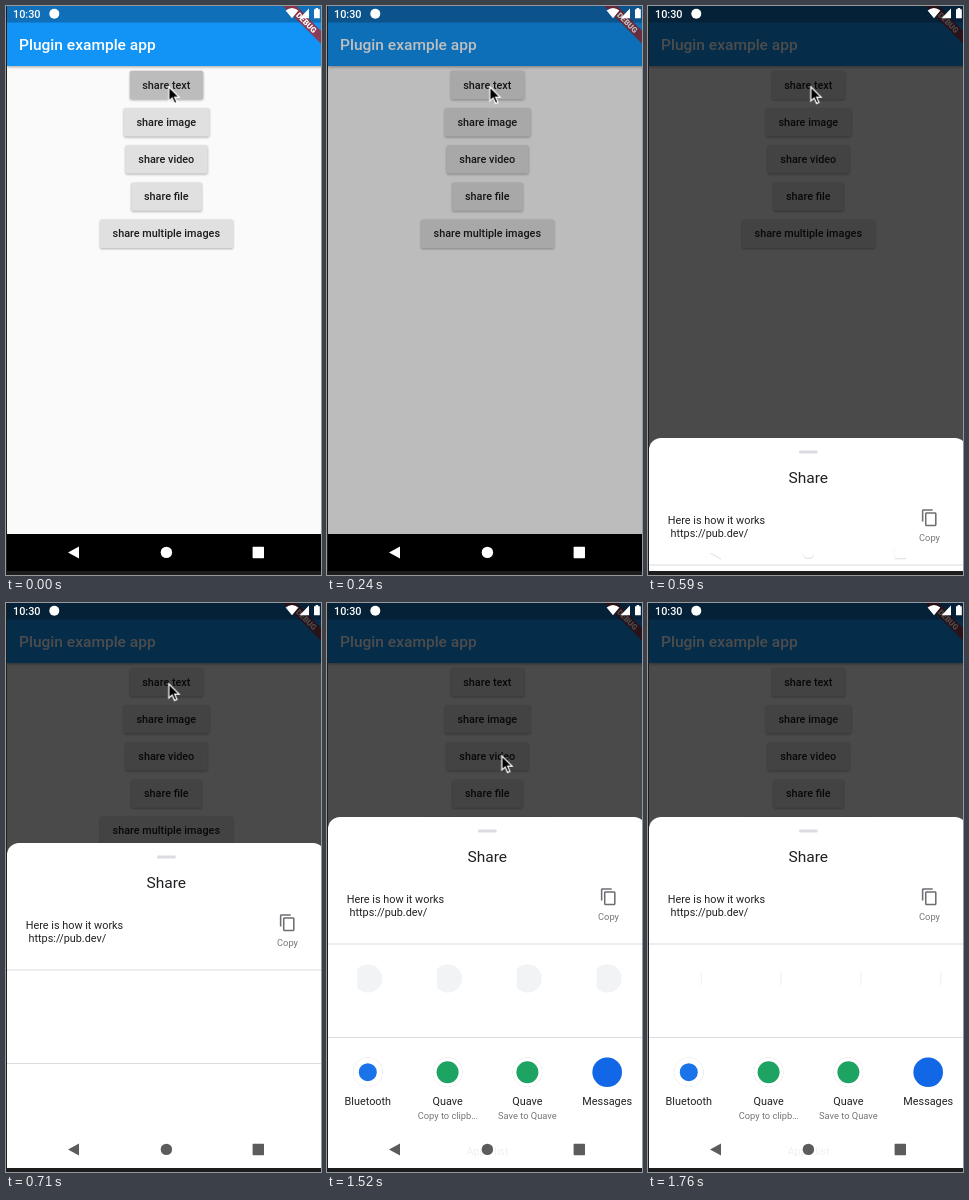
Animation of 315x569 px, one loop 3150 ms. Source, as an HTML page:

```html
<!DOCTYPE html>
<html lang="en">
<head>
<meta charset="utf-8">
<title>Share sheet</title>
<style>
  html, body { margin: 0; width: 100%; height: 100%; overflow: hidden; background: #1d1d1d; }
  svg { display: block; width: 315px; height: 569px; font: 10.85px Roboto, sans-serif; }
  .mid { text-anchor: middle; }
  .medium { font-weight: 500; }
  .small { font-size: 9.3px; fill: #757575; }
  .raised { fill: #e0e0e0; filter: drop-shadow(0 1px .8px rgba(0, 0, 0, .3)); }
  .disc { fill: #fff; filter: drop-shadow(0 .6px .7px rgba(0, 0, 0, .28)); }
  .bar { fill: #1294f6; filter: drop-shadow(0 1px 1.5px rgba(0, 0, 0, .35)); }
  .line { fill: #dadce0; }

  .step { animation: 3150ms step-end infinite; }
  #press { animation-name: press; }
  #dim { animation-name: dim; }
  #sheet { animation-name: rise; }
  #apps { animation-name: load; }
  #nav { animation-name: nav; }
  #cursor { animation-name: point; }
  .ghost { fill: #f2f3f5; animation-name: sweep; }

  @keyframes press {
    0% { opacity: .16; }
    3.809% { opacity: .06; }
    7.619%, 100% { opacity: 0; }
  }
  @keyframes dim {
    0% { opacity: 0; }
    3.809% { opacity: .06; }
    7.619% { opacity: .25; }
    11.428%, 100% { opacity: .7; }
  }
  @keyframes rise {
    0% { transform: translateY(580px); }
    18.73% { transform: translateY(432px); }
    22.539% { transform: translateY(240px); }
    26.349%, 100% { transform: translateY(214px); }
  }
  @keyframes load {
    0% { opacity: 0; }
    26.349%, 100% { opacity: 1; }
  }
  @keyframes nav {
    0% { fill: #fff; filter: none; }
    18.73% { fill: #fff; filter: drop-shadow(0 1px 0 #ddd); }
    22.539%, 100% { fill: #5c5c5c; filter: none; }
  }
  @keyframes sweep {
    0% { clip-path: inset(0 100% 0 0); }
    29.841% { clip-path: inset(0 70% 0 0); }
    48.253% { clip-path: inset(0 0 0 12%); }
    52.063% { clip-path: inset(0 0 0 55%); }
    55.873%, 100% { clip-path: inset(0 4% 0 91%); }
  }
  @keyframes point {
    0% { transform: translate(162.8px, 80.8px); }
    48.253% { transform: translate(174.8px, 152.8px); }
    52.063% { transform: translate(217.8px, 537.5px); }
    55.873%, 100% { transform: translate(400px, 600px); }
  }
</style>
</head>
<body>
<svg viewBox="0 0 315 569">
  <!-- app page -->
  <rect x="1" width="314" height="528" fill="#fafafa"/>
  <rect class="bar" x="1" y="10" width="318" height="50"/>
  <rect x="1" width="314" height="16.5" fill="#0f6fb8"/>
  <text class="medium" x="13" y="44" font-size="15.54" fill="#fff">Plugin example app</text>
  <g id="buttons"></g>
  <rect id="press" class="step" x="123.8" y="64.8" width="73.4" height="28.4" rx="1.6"/>
  <text class="mid medium" x="160.3" y="82.5" fill="#1c1c1c">share text</text>
  <g transform="translate(319 -2) rotate(45)">
    <rect x="-31" y="21.7" width="62" height="9.3" fill="#b71c1c" opacity=".72"/>
    <text class="mid" y="29.2" font-size="7.9" font-weight="900" fill="#fff">DEBUG</text>
  </g>
  <rect id="dim" class="step" x="1" width="314" height="528"/>

  <!-- status bar -->
  <g fill="#fff">
    <text class="medium" x="7" y="12">10:30</text>
    <circle cx="48.3" cy="7.7" r="5"/>
    <path d="M279.6 4.4Q286 -.6 292.4 4.4L286 12.2ZM303 2.4V12.2H293.6ZM308 3.2H309.6V2H312.2V3.2H313.8V12.2H308Z"/>
  </g>
  <rect x="1" y="528" width="314" height="37"/>

  <!-- share sheet -->
  <g id="sheet" class="step" fill="#202124">
    <rect x="1" width="318" height="400" rx="12" fill="#fff"/>
    <rect class="line" x="151" y="12.6" width="18.6" height="3" rx="1"/>
    <text class="mid" x="160.3" y="45" font-size="15.54">Share</text>
    <text x="19.8" y="86">Here is how it works</text>
    <text x="22.5" y="98.6">https://pub.dev/</text>
    <path transform="translate(272.3 70.4) scale(.775)" fill="#6b6e72" d="M16 1H4c-1.1 0-2 .9-2 2v14h2V3h12V1zm3 4H8c-1.1 0-2 .9-2 2v14c0 1.1.9 2 2 2h11c1.1 0 2-.9 2-2V7c0-1.1-.9-2-2-2zm0 16H8V7h11v14z"/>
    <text class="mid small" x="281.5" y="102.8">Copy</text>
    <rect class="line" x="1" y="126.5" width="314" height="1"/>
    <rect class="line" x="1" y="220" width="314" height="1"/>
    <g id="ghosts"></g>
    <g id="apps" class="step"></g>
    <text class="mid" x="160.5" y="338" fill="#f0f0f0">Apps list</text>
  </g>

  <g id="nav" class="step">
    <path d="M62 546.4L73 540.4V552.4Z"/>
    <circle cx="160.4" cy="546.4" r="5.7"/>
    <rect x="246.6" y="540.8" width="11.4" height="11.4" rx=".6"/>
  </g>
  <rect y="565" width="315" height="4" fill="#1d1d1d"/>
  <rect width="1" height="569" fill="#1d1d1d"/>

  <path id="cursor" class="step" d="M0 0V14.2L3.3 11.2L5.7 16.6L8.1 15.6L5.8 10.3H10.3Z" stroke="#fff" stroke-width="1.2"/>
</svg>
<script>
  const put = (id, html) => { document.getElementById(id).innerHTML = html; };

  const buttons = [['text', 73.4], ['image', 85.6], ['video', 82], ['file', 70.4], ['multiple images', 133]];
  put('buttons', buttons.map(([name, w], i) => {
    const y = 64.8 + i * 37.2;
    const label = i ? `<text class="mid medium" x="160.3" y="${y + 17.7}" fill="#1c1c1c">share ${name}</text>` : '';
    return `<rect class="raised" x="${160.6 - w / 2}" y="${y}" width="${w}" height="28.4" rx="1.6"/>${label}`;
  }).join(''));

  const apps = [
    { name: 'Bluetooth', color: '#1a73e8', r: 9 },
    { name: 'Quave', note: 'Copy to clipb…', color: '#1da362', r: 11 },
    { name: 'Quave', note: 'Save to Quave', color: '#1da362', r: 11 },
    { name: 'Messages', color: '#1267e6', r: 14.8 }
  ];
  const column = i => 40.8 + i * 79.8;
  put('ghosts', apps.map((_, i) =>
    `<circle class="ghost step" cx="${column(i) + .2}" cy="161.5" r="14.2"/>`).join(''));
  put('apps', apps.map(({ name, note = '', color, r }, i) => {
    const x = column(i);
    return `<circle class="disc" cx="${x}" cy="255.2" r="14.7"/>
      <circle cx="${x}" cy="255.2" r="${r}" fill="${color}"/>
      <text class="mid" x="${x}" y="288.3">${name}</text>
      <text class="mid small" x="${x}" y="301.6">${note}</text>`;
  }).join(''));
</script>
</body>
</html>
```
